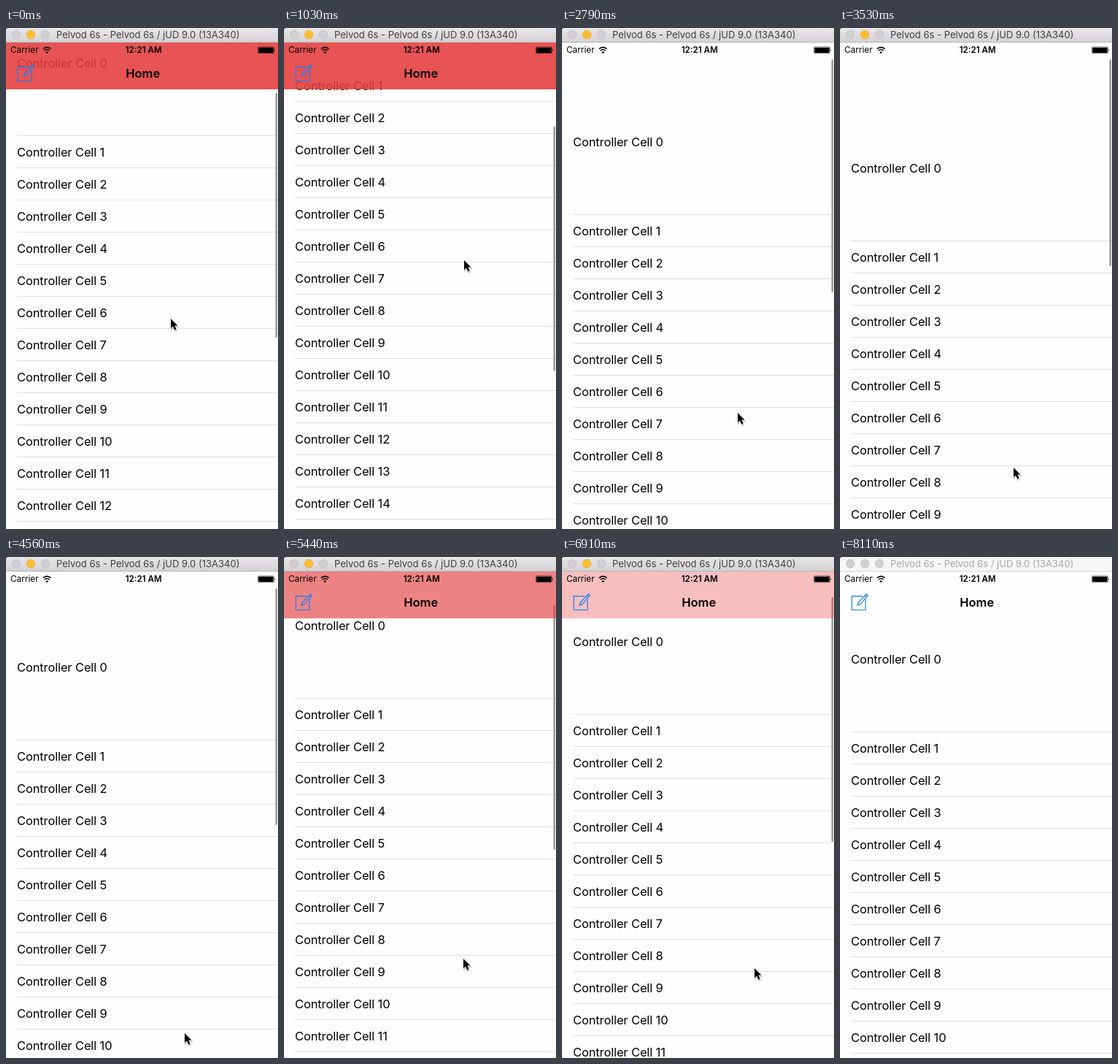
These frames come from a looping animation (373x686 px, 8.14 s). An HTML page:

```html
<!DOCTYPE html>
<html lang="en">
<head>
<meta charset="utf-8">
<title>Bouncing list</title>
<style>
  html, body { margin: 0; width: 100%; height: 100%; overflow: hidden; background: #fefefe; }
  svg { display: block; font-family: Inter, "Liberation Sans", sans-serif; }
  #list text { font-size: 16.5px; letter-spacing: -0.13px; }
  #list rect { fill: #dfdee2; }
  #caption { font-size: 13px; }
  .dot { fill: #d0ced0; stroke: #bcbabc; stroke-width: .6; }
  .status { font-size: 11.8px; }
  .bold { font-weight: 600; text-anchor: middle; }
</style>
</head>
<body>
<svg width="373" height="686" viewBox="0 0 373 686">
  <defs>
    <linearGradient id="chrome" x2="0" y2="1">
      <stop offset="0" stop-color="#e9e7e9"/>
      <stop offset="1" stop-color="#d2d0d2"/>
    </linearGradient>
    <path id="arrow" d="M0 0V13.2L3 10.4 5.2 15.4 7.6 14.4 5.4 9.6H9.4z"/>
  </defs>
  <rect width="373" height="686" fill="#fefefe"/>
  <g id="list"></g>
  <rect id="bar" x="369.5" width="2.5" rx="1.25" fill-opacity=".4"/>

  <rect id="tint" y="20" width="373" height="64" fill="#e53c3c"/>
  <g id="nav">
    <g fill="none" stroke="#157efb" stroke-width="1.2">
      <path d="M31 53.6H16.2V72.5H35V58"/>
      <path d="M24 66.2l1.4-4.2L36.2 50.6l2.2 2L28 64.6zM34 53l2.3 2"/>
    </g>
    <text class="bold" x="187.7" y="68" font-size="16.5">Home</text>
  </g>

  <text class="status" x="6" y="34.3">Carrier</text>
  <g fill="none" stroke="#000" stroke-width="1.6">
    <path d="M50.8 28.6q5.4-4.6 10.8 0M52.7 31q3.5-3 7 0"/>
    <path d="M56.2 35.2l-1.9-2.2q1.9-1.4 3.8 0z" fill="#000" stroke="none"/>
  </g>
  <text class="status bold" x="188.7" y="34.3" style="font-size:11.6px">12:21 AM</text>
  <rect x="345.4" y="25.9" width="22" height="8.8" rx="1.4" fill="none" stroke="#000" stroke-width=".5"/>
  <rect x="346.2" y="26.7" width="20.4" height="7.2" rx=".6"/>
  <path d="M368.2 28.6q1.6 1.7 0 3.4z"/>

  <rect id="top" width="373" height="20"/>
  <rect id="edge" y="19" width="373" height="1"/>
  <path d="M0 0h2L0 2z" fill="#444"/>
  <circle class="dot" cx="14" cy="9" r="5.8"/>
  <circle class="dot" id="amber" cx="34" cy="9" r="5.8"/>
  <circle class="dot" cx="54" cy="9" r="5.8"/>
  <text id="caption" x="69" y="14">Pelvod 6s - Pelvod 6s / jUD 9.0 (13A340)</text>

  <g id="cursor">
    <use href="#arrow" x=".6" y="1.6" stroke="#000" stroke-width="1.6" opacity=".22"/>
    <use href="#arrow" stroke="#fff" stroke-width="1.1" paint-order="stroke"/>
  </g>
</svg>
<script>
const LOOP = 8140, STEP = 147.1, BLUR_AT = 8110;
const REST = 239, ROW = 44, BAR_TOP = 43, BAR_LENGTH = 335;

// Turning points of the drags: pulled is the list's shift before the rubber band.
const moves = [
  { at: 0, x: 226, y: 398, pulled: -92 },
  { at: 5, x: 247, y: 315, pulled: -186 },
  { at: 6, x: 247, y: 315, pulled: -186 },
  { at: 14, x: 244, y: 432, pulled: -65 },
  { at: 17, x: 241, y: 523, pulled: 28 },
  { at: 18, x: 241, y: 523, pulled: 28 },
  { at: 24, x: 238, y: 602, pulled: 104 },
  { at: 29, x: 244, y: 652, pulled: 154 },
  { at: 31, x: 245, y: 652, pulled: 22 },
  { at: 34, x: 246, y: 610, pulled: 0 },
  { at: 41, x: 247, y: 495, pulled: -93 },
  { at: 50, x: 283, y: 625, pulled: 0 },
  { at: 52, x: 380, y: 700, pulled: 0 }
];

const el = id => document.getElementById(id);
const set = (id, attrs) => {
  for (const name in attrs) el(id).setAttribute(name, attrs[name]);
};
const clamp = v => Math.min(1, Math.max(0, v));

function slope(i, name) {
  const rate = j => (moves[j + 1][name] - moves[j][name]) / (moves[j + 1].at - moves[j].at);
  if (i === 0 || i === moves.length - 1) return 0;
  const before = rate(i - 1), after = rate(i);
  return before * after > 0 ? 2 * before * after / (before + after) : 0;
}

// Smooth curve through the turning points that never overshoots them.
function follow(name, step) {
  const last = moves.length - 1;
  if (step >= moves[last].at) return moves[last][name];
  const i = moves.findIndex(m => m.at > step) - 1;
  const a = moves[i], b = moves[i + 1];
  const span = b.at - a.at, t = (step - a.at) / span, u = 1 - t;
  return a[name] * u * u * (1 + 2 * t) + b[name] * t * t * (1 + 2 * u) +
    span * t * u * (slope(i, name) * u - slope(i + 1, name) * t);
}

// The list's own zero is the line under the first, taller cell.
let rows = '';
for (let i = 0; i < 18; i++) {
  const baseline = i ? i * ROW - 15 : -93;
  rows += `<text x="15" y="${baseline}">Controller Cell ${i}</text>` +
    `<rect x="15" y="${i * ROW}" width="358" height="1"/>`;
}
el('list').innerHTML = rows;

function draw(time) {
  const step = Math.floor((time + 12) / STEP);
  const pulled = follow('pulled', step);
  const shift = Math.round(pulled > 0 ? pulled / 2 : pulled);
  const active = time < BLUR_AT;

  set('list', { transform: `translate(0 ${REST + shift})` });
  set('bar', {
    y: BAR_TOP + Math.max(0, -shift) / 2,
    height: BAR_LENGTH - Math.max(0, shift),
    opacity: clamp((52 - step) / 2)
  });
  set('tint', { opacity: 0.88 * clamp(-shift / 64) });
  set('nav', { visibility: shift > 0 ? 'hidden' : 'visible' });
  set('cursor', {
    transform: `translate(${Math.round(follow('x', step))} ${Math.round(follow('y', step))})`
  });

  set('top', { fill: active ? 'url(#chrome)' : '#f6f6f6' });
  set('edge', { fill: active ? '#b8b6b8' : '#d6d6d6' });
  set('caption', { fill: active ? '#404040' : '#a9a9a9' });
  el('amber').style.fill = active ? '#ffbd2e' : '';
  el('amber').style.stroke = active ? '#e0a32a' : '';
}

const start = performance.now();
function tick() {
  draw((performance.now() - start) % LOOP);
  requestAnimationFrame(tick);
}
tick();
</script>
</body>
</html>
```
